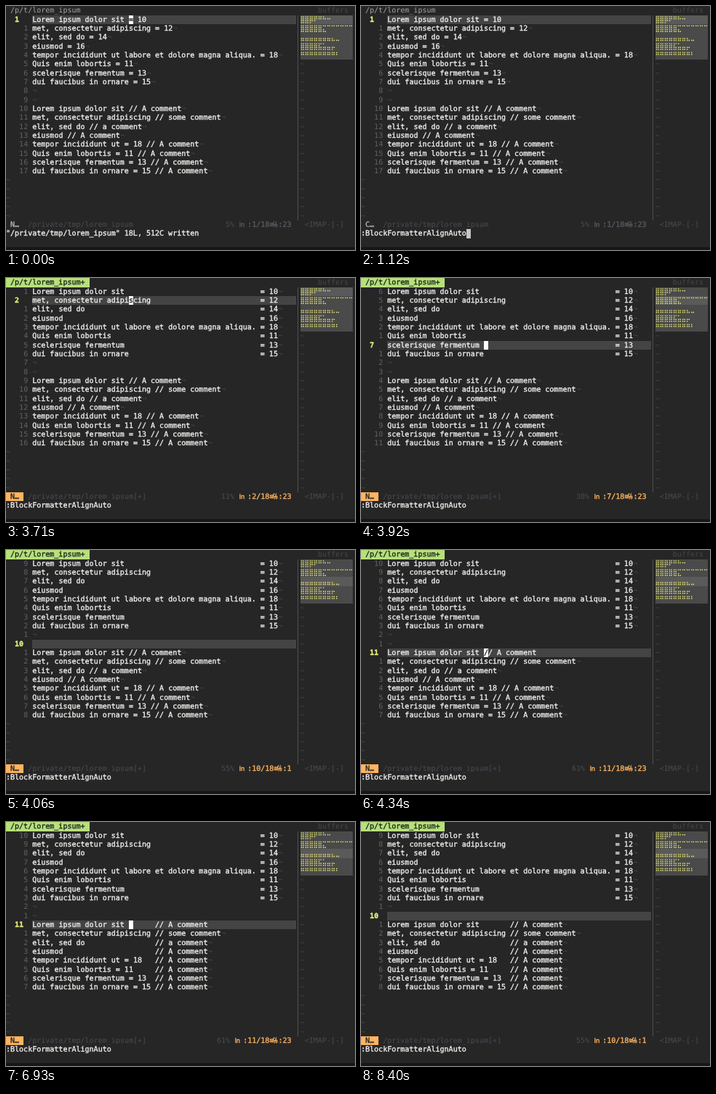
These frames come from a looping animation (480x337 px, 8750 ms). An HTML page:

```html
<!DOCTYPE html>
<html lang="en">
<head>
<meta charset="utf-8">
<title>Aligning text blocks</title>
<style>
  html, body { margin: 0; width: 100%; height: 100%; overflow: hidden; background: #262626; }
  #screen {
    position: absolute; inset: 0; overflow: hidden; color: #f0f0ee;
    font: 10.033px/13.3px "DejaVu Sans Mono", "Noto Sans Mono", monospace;
    text-rendering: geometricPrecision; font-variant-ligatures: none;
  }
  #screen span, #screen i { position: absolute; white-space: pre; }
  #screen span { -webkit-text-stroke: 0.35px; }
  #screen svg { position: absolute; inset: 0; fill: #dfe070; }
  #screen .dim { color: #474c53; -webkit-text-stroke: 0; }
  #screen .faint { color: #474747; -webkit-text-stroke: 0; }
  #screen .num { color: #626262; -webkit-text-stroke: 0; }
  .now { color: #e3ec7c; font-weight: 700; }
  #screen .title { color: #a3a3a3; -webkit-text-stroke: 0; }
  .mode { color: #b5b5b5; }
  .pos { color: #565b62; }
  .hot { color: #ffb45f; }
  .dark { color: #222; }
  .ln { font-family: Inter, sans-serif; font-size: 9px; }
  #edge { position: absolute; left: 0; right: 0; top: 333px; bottom: 0; background: #161616; }
  #split { position: absolute; left: 401px; top: 13px; width: 1px; height: 283px; background: #505050; }
</style>
</head>
<body>
<div id="screen"></div>
<div id="split"></div>
<div id="edge"></div>
<script>
const LOOP = 8750, CW = 6.04, RH = 12.32, TOP = 0.4;
const COMMAND = ":BlockFormatterAlignAuto";
const MESSAGE = '"/private/tmp/lorem_ipsum" 18L, 512C written';
const screen = document.getElementById("screen");

const lines = [
  "Lorem ipsum dolor sit = 10",
  "met, consectetur adipiscing = 12",
  "elit, sed do = 14",
  "eiusmod = 16",
  "tempor incididunt ut labore et dolore magna aliqua. = 18",
  "Quis enim lobortis = 11",
  "scelerisque fermentum = 13",
  "dui faucibus in ornare = 15",
  "", "",
  "Lorem ipsum dolor sit // A comment",
  "met, consectetur adipiscing // some comment",
  "elit, sed do // a comment",
  "eiusmod // A comment",
  "tempor incididunt ut = 18 // A comment",
  "Quis enim lobortis = 11 // A comment",
  "scelerisque fermentum = 13 // A comment",
  "dui faucibus in ornare = 15 // A comment"
];
const longest = Math.max(...lines.map(s => s.length));

// [time, value] pairs; the last one reached holds
const cursorLine = [[0, 1], [3710, 2], [3780, 4], [3850, 5], [3920, 7],
                    [3990, 9], [4060, 10], [4200, 11], [7000, 10]];
const commandLine = [[0, MESSAGE], [560, ":"], [1120, COMMAND], [4690, ":"], [4970, COMMAND]];
const typing = [[0, false], [560, true], [2100, false], [4690, true], [6020, false]];
const alignedBlocks = [[0, 0], [2100, 1], [6020, 2]];

const at = (track, t) => track.filter(([start]) => start <= t).pop()[1];

function align(block, mark) {
  const parts = block.map(s => s.split(mark));
  const width = Math.max(...parts.map(p => p[0].length));
  return parts.map(([left, right]) => left.padEnd(width) + mark + right);
}

function buffer(count) {
  const first = lines.slice(0, 8), second = lines.slice(10);
  return [
    ...(count > 0 ? align(first, " = ") : first), "", "",
    ...(count > 1 ? align(second, " // ") : second)
  ];
}

const place = (row, col) => `left:${(col * CW).toFixed(2)}px;top:${(TOP + row * RH).toFixed(2)}px`;
const escape = s => s.replace(/&/g, "&amp;").replace(/</g, "&lt;");
const put = (row, col, text, cls = "") =>
  `<span class="${cls}" style="${place(row, col)}">${escape(text)}</span>`;
const fill = (row, col, cols, color, rows = 1) =>
  `<i style="${place(row, col)};width:${cols * CW}px;height:${rows * RH}px;background:${color}"></i>`;

// Each text line is one row of dots; a cell holds four rows of two dots
function minimapDots() {
  let dots = "";
  lines.forEach((text, n) => {
    const y = TOP + RH * (1 + Math.floor(n / 4)) + 2.3 + (n % 4) * 2.6;
    const count = Math.round(text.length / longest * 24);
    for (let i = 0; i < count; i++) {
      const x = (67 + Math.floor(i / 2)) * CW + 1.75 + (i % 2) * 2.55;
      dots += `<circle cx="${x.toFixed(2)}" cy="${y.toFixed(2)}" r="0.85"/>`;
    }
  });
  return `<svg width="480" height="337">${dots}</svg>`;
}
const dots = minimapDots();

function minimap(line) {
  let out = fill(1, 67, 12, "#4a4a4a", 5) + fill(Math.ceil(line / 4), 67, 12, "#5a5a5a") + dots;
  for (let row = 6; row < 24; row++) out += put(row, 67, "~", "faint");
  return out;
}

function editor(text, line, inCommand) {
  let out = fill(line, 6, 60, "#444");
  text.forEach((s, i) => {
    const row = i + 1, current = row === line;
    const gap = String(Math.abs(row - line));
    out += current ? put(row, 2, String(row), "now") : put(row, 5 - gap.length, gap, "num");
    out += put(row, 6, s);
    if (!current) out += put(row, 6 + s.length, "¬", "faint");
    if (current && s && !inCommand)
      out += fill(row, 28, 1, "#fff") + put(row, 28, s[22], "dark");
  });
  for (let row = 19; row < 24; row++) out += put(row, 0, "~", "dim");
  return out;
}

function statusBar(line, col, inCommand, modified) {
  const row = 24, cls = modified ? "hot" : "pos";
  const position = `:${line}/18`, column = `:${col}`;
  const percent = Math.floor(line / 18 * 100) + "%";
  const colAt = 65 - column.length, lineAt = colAt - 2 - position.length;
  return (modified ? fill(row, 0, 4, "#ffb45f") : "") +
    put(row, 1, inCommand ? "C…" : "N…", modified ? "dark" : "mode") +
    put(row, 5, "/private/tmp/lorem_ipsum" + (modified ? "[+]" : ""), "dim") +
    put(row, lineAt - 3 - percent.length, percent, "dim") +
    put(row, lineAt - 1.9, "ln", cls + " ln") +
    put(row, lineAt, position, cls) +
    put(row, colAt - 2, "≡", cls) + put(row, colAt - 1.2, "℅", cls) +
    put(row, colAt, column, cls) +
    put(row, 68, "<IMAP-[-]", "dim");
}

function draw(line, command, inCommand, blocks) {
  const text = buffer(blocks), modified = blocks > 0;
  const tab = modified
    ? fill(0, 0, 19, "#b6e07a") + put(0, 1, "/p/t/lorem_ipsum+", "dark")
    : put(0, 1, "/p/t/lorem_ipsum", "title");
  screen.innerHTML = tab + put(0, 71, "buffers", "faint") +
    editor(text, line, inCommand) + minimap(line) +
    statusBar(line, text[line - 1] ? 23 : 1, inCommand, modified) +
    put(25, 0, command) +
    (inCommand ? fill(25, command.length, 1, "#c4c4c4") : "");
}

let shown = "";
function tick() {
  const t = performance.now() % LOOP;
  const state = [cursorLine, commandLine, typing, alignedBlocks].map(track => at(track, t));
  const key = state.join("|");
  if (key !== shown) {
    draw(...state);
    shown = key;
  }
  requestAnimationFrame(tick);
}
tick();
</script>
</body>
</html>
```
